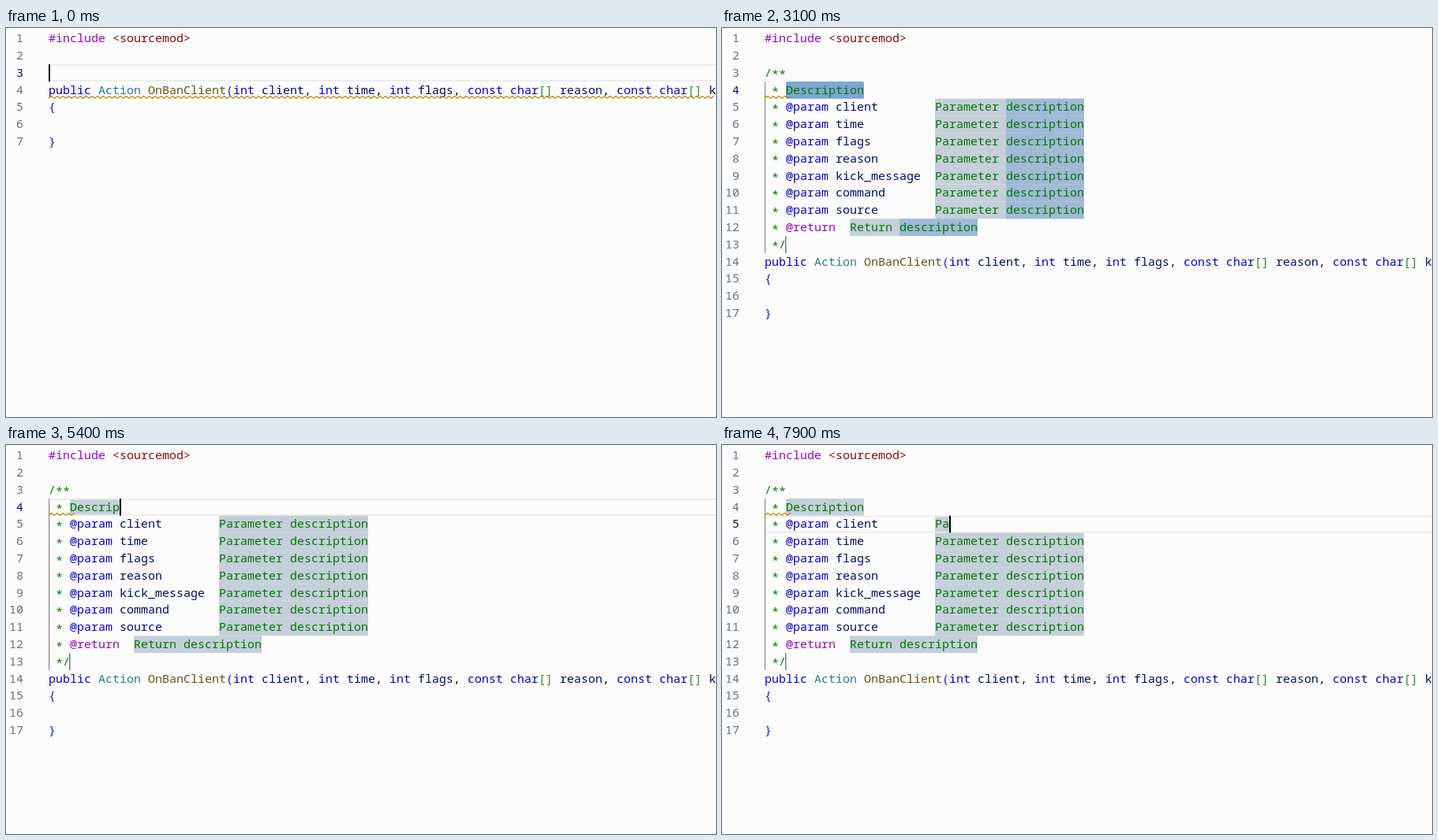
An HTML page for the animation above (8000 ms loop, 900x494 px).

```html
<!DOCTYPE html>
<html lang="en">
<head>
<meta charset="utf-8">
<title>Doc comment completion</title>
<style>
  html, body { margin: 0; width: 100%; height: 100%; overflow: hidden; background: #fcfcfc; }
  svg { display: block; }
  text { font: 15px "Noto Sans Mono", "DejaVu Sans Mono", monospace; white-space: pre; }
</style>
</head>
<body>
<svg id="stage" width="900" height="494" viewBox="0 0 900 494"></svg>
<script>
const LOOP = 8000, LEFT = 54, CHAR = 9, LINE = 21.8, TOP = 2.5;
const COLORS = {
  k: '#0500d0', t: '#2e7a8e', f: '#6a5118', v: '#000c70', c: '#007800', p: '#9608c0',
  s: '#840d0d', b: '#0a20e0', g: '#2f8b2f', o: '#111', n: '#667078', a: '#0b0a70'
};
const SNIPPET = '#c5cfda', MATCH = '#9fb9d7', SELECTED = '#7da6d5';
const WARN = '#b98708', ERROR = '#d01818';

// Lines are written as style~text pieces joined by "|".
const INCLUDE = 'p~#include |s~<sourcemod>';
const SIGNATURE = 'k~public |t~Action |f~OnBanClient|b~(|k~int |v~client|o~, |k~int |v~time|o~, ' +
  '|k~int |v~flags|o~, |k~const char|g~[]|v~ reason|o~, |k~const char|g~[]|v~ kick_message';
const PARAMS = ['client', 'time', 'flags', 'reason', 'kick_message', 'command', 'source'];
const SUMMARY = 'Description', DETAIL = 'Parameter description';

const colX = col => LEFT + col * CHAR;
const rowY = row => TOP + (row - 1) * LINE;
const escapeText = s => s.replace(/</g, '&lt;').replace(/>/g, '&gt;');

const rect = (x, y, w, h, fill, extra = '') =>
  `<rect x="${x}" y="${y}" width="${w}" height="${h}" fill="${fill}" ${extra}/>`;

const label = (x, y, text, fill, extra = '') =>
  `<text x="${x}" y="${y}" fill="${fill}" ${extra}>${escapeText(text)}</text>`;

function code(row, line, override) {
  let col = 0, out = '';
  for (const piece of line.split('|')) {
    const [style, text] = piece.split('~');
    for (const part of text.split(/(\*)/)) {
      const y = rowY(row) + (part === '*' ? 18.2 : 15.7);
      if (part.trim()) out += label(colX(col), y, part, COLORS[override || style]);
      col += part.length;
    }
  }
  return out;
}

const mark = (row, col, length, fill, extra) =>
  rect(colX(col), rowY(row), length * CHAR, LINE, fill, extra);

function squiggle(row, length, color) {
  const bottom = rowY(row + 1), end = colX(length);
  let d = '';
  for (let x = LEFT, up = false; x <= end; x += 3.65, up = !up)
    d += `${d ? 'L' : 'M'}${x.toFixed(2)} ${(bottom - (up ? 3.2 : 0.5)).toFixed(2)}`;
  return `<path d="${d}" fill="none" stroke="${color}" stroke-width="1.2"/>`;
}

function gutter(count, active) {
  let out = '';
  for (let row = 1; row <= count; row++)
    out += label(22, rowY(row) + 15.7, String(row), COLORS[row === active ? 'a' : 'n'], 'text-anchor="end"');
  return out;
}

const activeLine = row =>
  rect(LEFT, rowY(row), 900, 1.7, '#e9e9e9') + rect(LEFT, rowY(row + 1) - 1.7, 900, 1.7, '#e9e9e9');

// The caret blinks every half second, counted from the last edit.
const caret = (row, col, since) =>
  since % 1000 < 500 ? rect(colX(col), rowY(row), 2, LINE, '#000') : '';

function popup() {
  return rect(73, 68.5, 522.5, 25, '#e1e1e1', 'rx="3" stroke="#c4c4c4"') +
    '<path d="M79 86V72H93.5V86" fill="none" stroke="#333" stroke-width="1.3"/>' +
    '<path d="M78.5 87.4H95" stroke="#333" stroke-width="1.4" stroke-dasharray="1.5 1.5"/>' +
    label(100, 84.5, 'Insert documentation', '#000');
}

function beforeInsert(t) {
  const edits = [[0, ''], [1200, '/'], [1500, '/*'], [2300, '/**']];
  const [start, typed] = edits.filter(e => e[0] <= t).pop();
  const tint = typed.length > 1 ? 'c' : '';
  return activeLine(3) + gutter(7, 3) + code(1, INCLUDE) +
    code(3, 'o~' + typed, tint) + code(4, SIGNATURE, tint) +
    code(5, 'b~{', tint) + code(7, 'b~}', tint) +
    squiggle(4, 94, WARN) + (tint ? squiggle(3, typed.length, ERROR) : '') +
    caret(3, typed.length, t - start) + (t >= 1600 ? popup() : '');
}

// A field is shown selected until typing replaces its text.
function field(t, opened, firstKey, text) {
  const selected = t < firstKey;
  const keys = Math.min(text.length, 1 + Math.floor((t - firstKey) / 180));
  return {
    selected,
    text: selected ? text : text.slice(0, keys),
    since: t - (selected ? opened : firstKey + (keys - 1) * 180)
  };
}

function afterInsert(t) {
  const second = t >= 6250;
  const edit = second ? field(t, 6250, 7600, DETAIL) : field(t, 2600, 4250, SUMMARY);
  const active = second ? 5 : 4, col = second ? 24 : 3;
  const summary = second ? SUMMARY : edit.text;
  let back = '', lines = '';

  back += mark(4, 3, summary.length, SNIPPET);
  PARAMS.forEach((name, i) => {
    const row = 5 + i, text = second && i === 0 ? edit.text : DETAIL;
    back += mark(row, 24, text.length, edit.selected && second ? MATCH : SNIPPET);
    if (edit.selected && !second) back += mark(row, 34, 11, MATCH);
    lines += code(row, `c~ * |k~@param |v~${name.padEnd(14)}|c~${text}`);
  });
  back += mark(12, 12, 18, SNIPPET);
  if (edit.selected) {
    if (!second) back += mark(12, 19, 11, MATCH);
    back += mark(active, col, edit.text.length, SELECTED, 'rx="3"');
    if (second) back += `<circle cx="${colX(33.5)}" cy="${rowY(5) + 11}" r="1" fill="#4d7f9f"/>`;
  } else {
    back += activeLine(active);
  }

  return back + gutter(17, active) +
    rect(LEFT, rowY(4), 1.2, LINE * 10, '#8c8c8c') +
    rect(colX(3) - 1, rowY(13), 1.5, LINE, '#6b7b8d') +
    code(1, INCLUDE) + code(3, 'c~/**') + code(4, 'c~ * ' + summary) + lines +
    code(12, 'c~ * |p~@return  |c~Return description') + code(13, 'c~ */') +
    code(14, SIGNATURE) + code(15, 'b~{') + code(17, 'b~}') +
    squiggle(4, 4, WARN) + caret(active, col + edit.text.length, edit.since);
}

const stage = document.getElementById('stage');
let shown = '';

function draw() {
  const t = performance.now() % LOOP;
  const picture = t < 2600 ? beforeInsert(t) : afterInsert(t);
  if (picture !== shown) stage.innerHTML = shown = picture;
  requestAnimationFrame(draw);
}
draw();
</script>
</body>
</html>
```
